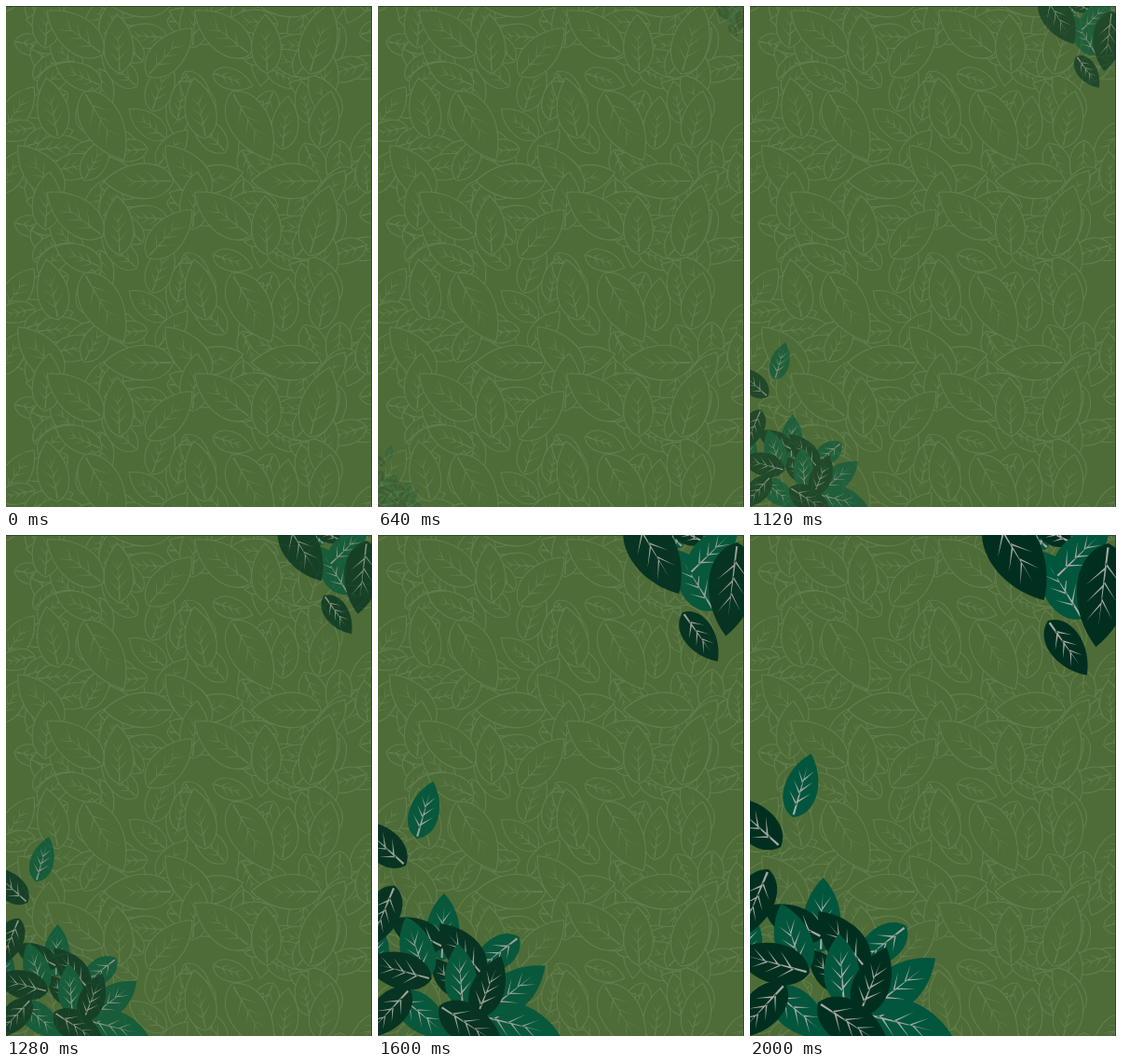
Animation, 393 px wide and 538 px high, one loop 5000 ms. Source, as an HTML page:

```html
<!DOCTYPE html>
<html lang="en">
<head>
<meta charset="utf-8">
<title>Leaves</title>
<style>
html, body { margin: 0; width: 100%; height: 100%; overflow: hidden; background: #4e6c37; }
svg { display: block; width: 393px; height: 538px; }
</style>
</head>
<body>
<svg id="stage" viewBox="0 0 393 538" xmlns="http://www.w3.org/2000/svg"></svg>
<script>
const W = 393, H = 538, LOOP = 5000, STEP = 40, ROW = 195, COL = 158.5;
const BG = '#4e6c37', LINE = '#617f4e', VEIN = '#a5aaa2';
const DARK = '#002f20', LIGHT = '#01563d';
const stage = document.getElementById('stage');

function add(parent, tag, attrs) {
  const el = document.createElementNS('http://www.w3.org/2000/svg', tag);
  for (const k in attrs) el.setAttribute(k, attrs[k]);
  parent.appendChild(el);
  return el;
}

// A leaf grows from its stem at (x, y) along an angle; its width follows its length.
function leaf(parent, [x, y, deg, len], style, veinColor, thick) {
  const a = deg * Math.PI / 180, c = Math.cos(a), s = Math.sin(a), w = len * .335;
  const at = (u, v) => (x + c * len * u - s * v).toFixed(1) + ' ' + (y + s * len * u + c * v).toFixed(1);
  const outline = `M${at(0, 0)}C${at(.12, w)} ${at(.66, w)} ${at(1, 0)}C${at(.66, -w)} ${at(.12, -w)} ${at(0, 0)}Z`;
  const half = thick / 2, e = thick * .6 / len;
  let rib = `M${at(.04, half)}L${at(.8, 0)}L${at(.04, -half)}Z`;
  for (let i = 0; i < 3; i++) {
    for (const side of [1, -1]) {
      const u = .2 + i * .17 + (side > 0 ? .04 : 0);
      rib += `M${at(u - e, 0)}L${at(u + .18, side * w * (.5 - i * .07))}L${at(u + e, 0)}Z`;
    }
  }
  add(parent, 'path', { d: outline, ...style });
  add(parent, 'path', { d: rib, fill: veinColor });
}

let seed = 17;
function rnd() {
  seed = (seed * 16807) % 2147483647;
  return seed / 2147483647;
}

// Leaves are given as stem x, y, angle, length.
const motif = [
  [152, 75, -47, 70], [180, 188, 180, 75], [84, 92, 60, 85], [60, 204, 229, 72],
  [42, 240, -86, 62], [104, 52, 218, 76], [122, 72, 268, 63], [56, 142, 259, 66]
];
const rightEdge = [[326, 73, -74, 78], [336, 152, -78, 62]];

function drawWallpaper() {
  const back = add(stage, 'g', {});
  const style = { fill: BG, stroke: LINE, 'stroke-width': 1.1 };
  const draw = (l, dx, dy) => leaf(back, [l[0] + dx, l[1] + dy, l[2], l[3]], style, LINE, 1.7);
  add(back, 'rect', { width: W, height: H, fill: BG });
  const filler = [];
  for (let i = 0; i < 84; i++) {
    const x = (i % 12) * 36 + rnd() * 30 - 10, y = Math.floor(i / 12) * 28 + rnd() * 24;
    filler.push([x, y, rnd() * 360, 44 + rnd() * 16]);
  }
  const rows = [-ROW, 0, ROW, 2 * ROW];
  for (const y of rows) filler.forEach(l => draw(l, 0, y));
  for (const y of rows) {
    for (const x of [0, COL]) motif.forEach(l => draw(l, x, y));
    rightEdge.forEach(l => draw(l, 0, y));
  }
  add(back, 'path', { d: `M0 .5H${W - .5}V${H}`, fill: 'none', stroke: '#2c4a2c', 'stroke-width': 1 });
}

// Layers from back to front, alternating light and dark.
const lowerLeft = [
  [[-8, 470, -79, 63], [76, 448, -88, 80]],
  [[78, 432, 207, 72], [20, 359, 113, 80], [33, 335, 222, 80], [100, 490, 231, 58]],
  [[46, 303, -74, 71], [58, 472, -108, 80], [168, 420, 142, 75]],
  [[126, 467, 230, 82]],
  [[118, 513, 14, 102], [128, 510, -38, 90], [101, 505, -94, 77], [22, 487, 40, 84]],
  [[117, 516, -68, 79], [38, 482, 133, 80], [64, 470, 195, 86], [73, 502, 33, 92]]
];
const upperRight = [
  [[320, 14, 220, 36]],
  [[345, 8, 206, 50]],
  [[357, 90, 238, 86], [328, 46, -44, 80]],
  [[258, -26, 59, 112], [385, 9, 97, 112], [320, 92, 54.5, 72]]
];

function corner(layers, x, y) {
  const g = add(stage, 'g', {});
  layers.forEach((layer, i) => {
    const style = { fill: i % 2 ? DARK : LIGHT };
    layer.forEach(l => leaf(g, l, style, VEIN, 2.4));
  });
  return { g, x, y };
}

drawWallpaper();
const corners = [corner(lowerLeft, 0, H), corner(upperRight, W, 0)];

// Each cluster grows out of its corner while fading in.
function render(time) {
  const t = Math.floor((time % LOOP) / STEP) * STEP;
  const u = Math.min(1, Math.max(0, (t - 30) / 1970));
  const s = t < 320 ? 0 : (1 - Math.cos(Math.PI * u)) / 2;
  for (const { g, x, y } of corners) {
    g.setAttribute('transform', `translate(${x} ${y}) scale(${s}) translate(${-x} ${-y})`);
    g.setAttribute('opacity', s);
  }
}

const start = performance.now();
function tick() {
  render(performance.now() - start);
  requestAnimationFrame(tick);
}
tick();
</script>
</body>
</html>
```
